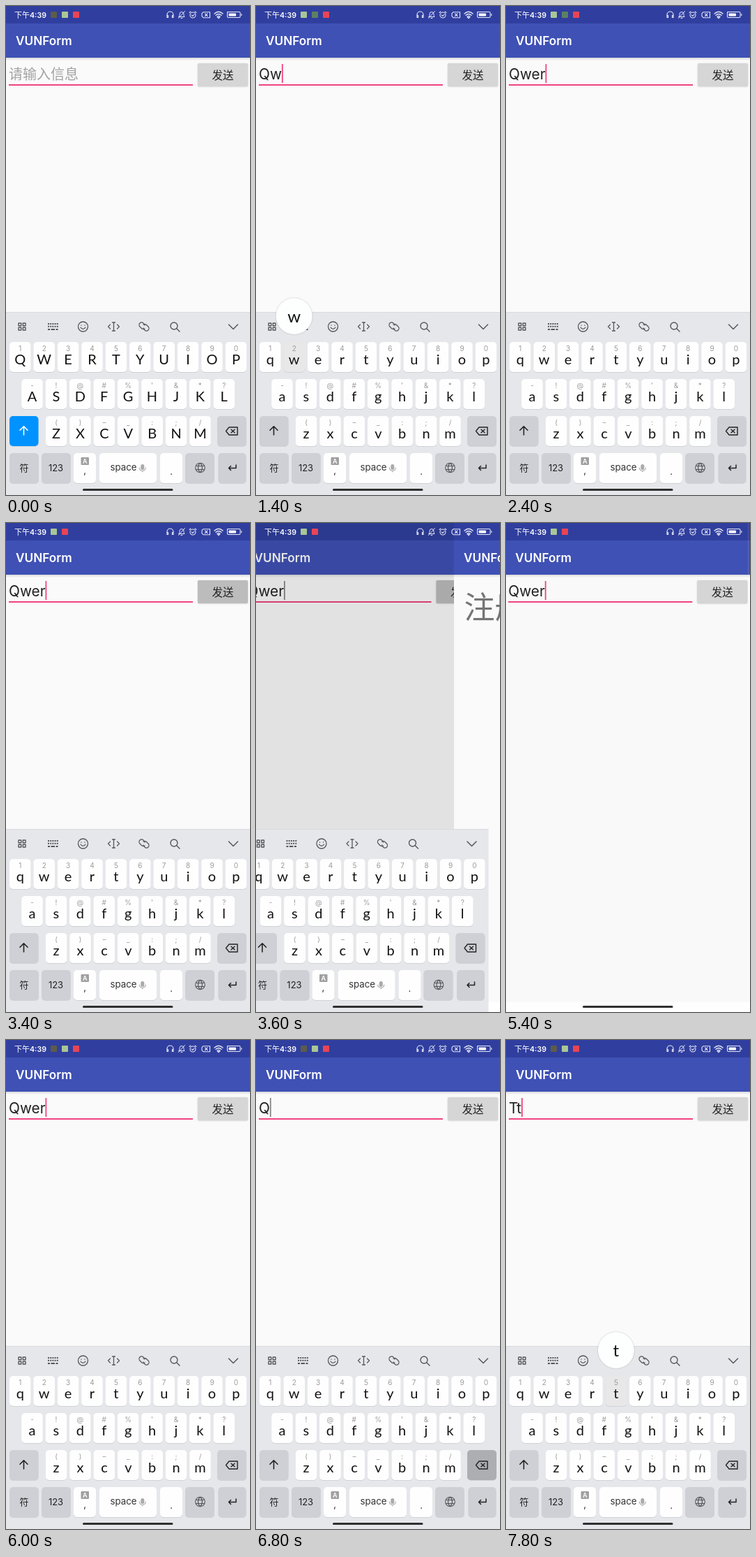
Write an HTML page with a canvas that moves like this. It is 350 px wide and 700 px high and loops after 8 s.

```html
<!DOCTYPE html>
<html lang="zh">
<head>
<meta charset="utf-8">
<title>Message form</title>
<style>
html, body { margin: 0; width: 350px; height: 700px; overflow: hidden; background: #fafafa; }
canvas { display: block; width: 350px; height: 700px; }
</style>
</head>
<body>
<canvas id="stage"></canvas>
<script>
const W = 350, H = 700, LOOP = 8000, STEP = 200;
const cv = document.getElementById('stage');
const c = cv.getContext('2d');
const dpr = window.devicePixelRatio || 1;
cv.width = W * dpr;
cv.height = H * dpr;

const LATIN = 'Inter, "Noto Sans CJK SC", "Noto Sans CJK", sans-serif';
const HAN = '"Noto Sans CJK SC", "Noto Sans CJK", sans-serif';
const KEYS = 'Lato, "Open Sans", sans-serif';
const FIELD = '20.8px ' + LATIN;
const DARK = '#5d5c48', GREEN = '#a9c795', MOSS = '#5d8062', RED = '#e94455', RUST = '#b8683f';
const INK = '#55575b', KEY_GREY = '#ced0d5', ACCENT = '#f1437f';

// Each entry changes only the listed parts of the state.
const events = [
  [0, { text: '', caps: true, press: '', cursor: '', sent: false, badges: [DARK, GREEN, RED] }],
  [200, { text: 'Q', press: 'q', cursor: ACCENT }],
  [400, { caps: false }],
  [600, { press: '' }],
  [800, { cursor: '#888' }],
  [1400, { text: 'Qw', press: 'w', cursor: ACCENT, badges: [GREEN, MOSS, RED] }],
  [1600, { press: '' }],
  [1800, { text: 'Qwe', press: 'e' }],
  [2000, { press: '' }],
  [2200, { text: 'Qwer', press: 'r' }],
  [2400, { press: '' }],
  [2600, { cursor: '' }],
  [2800, { cursor: ACCENT }],
  [3200, { sent: true, badges: [GREEN, RED] }],
  [3600, { cursor: '#888' }],
  [4000, { badges: [GREEN, RUST] }],
  [4400, { sent: false, cursor: ACCENT, badges: [GREEN, RED] }],
  [5800, { badges: [DARK, GREEN, RED] }],
  [6200, { press: 'del' }],
  [6400, { text: 'Qwe' }],
  [6600, { text: 'Qw' }],
  [6800, { text: 'Q', cursor: '#888' }],
  [7000, { text: '', press: '', caps: true, cursor: ACCENT }],
  [7200, { text: 'T', press: 't' }],
  [7400, { caps: false }],
  [7600, { press: '' }],
  [7800, { text: 'Tt', press: 't' }]
];

const stateAt = t => Object.assign({}, ...events.filter(e => e[0] <= t).map(e => e[1]));

function ease(t, start, span) {
  const u = Math.min(1, Math.max(0, (t - start) / span));
  return u * u * (3 - 2 * u);
}

function rect(x, y, w, h, color, r = 0) {
  c.fillStyle = color;
  c.beginPath();
  c.roundRect(x, y, w, h, r);
  c.fill();
}

function label(str, x, base, font, color, align = 'left') {
  c.font = font;
  c.fillStyle = color;
  c.textAlign = align;
  c.fillText(str, x, base);
}

function icon(path, x, y, color, width = 1.3) {
  c.save();
  c.translate(x, y);
  c.strokeStyle = color;
  c.lineWidth = width;
  c.lineCap = c.lineJoin = 'round';
  c.stroke(new Path2D(path));
  c.restore();
}

const ring = r => `M${r} 0A${r} ${r} 0 1 1 ${-r} 0A${r} ${r} 0 1 1 ${r} 0`;

function frame() {
  rect(0, 0, W, H, '#fafafa');
  rect(0, 686, W, 14, '#fff');
  const g = c.createLinearGradient(0, 74, 0, 78);
  g.addColorStop(0, 'rgba(0,0,0,.13)');
  g.addColorStop(1, 'rgba(0,0,0,0)');
  rect(0, 74, W, 4, g);
  rect(0, 0, W, 25, '#303f9f');
  rect(0, 25, W, 49, '#3f51b5');
  label('VUNForm', 14, 56, '600 17.2px ' + LATIN, '#fff');
}

function formPage(s) {
  frame();
  if (s.text) label(s.text, 4, 104.5, FIELD, '#222');
  else label('请输入信息', 4, 104.5, '20px ' + HAN, '#a2a2a2');
  if (s.cursor) {
    c.font = FIELD;
    rect(4 + c.measureText(s.text).width, 83, 1.8, 27, s.cursor);
  }
  rect(4, 112, 264, 2, ACCENT);
  c.save();
  c.shadowColor = 'rgba(0,0,0,.2)';
  c.shadowBlur = 2 * dpr;
  c.shadowOffsetY = 0.5 * dpr;
  rect(275, 82, 72, 33, s.sent ? '#bcbcbc' : '#d6d6d6', 2);
  c.restore();
  label('发送', 311, 104.5, '500 15.5px ' + HAN, '#222', 'center');
}

function donePage() {
  frame();
  label('注册成功', 14.5, 136.5, '500 44px ' + HAN, '#757575');
}

function statusBar(s) {
  const w = '#e4e6f4';
  label('下午', 12, 17, '500 11px ' + HAN, '#fff');
  label('4:39', 34, 16.8, '600 10.6px ' + LATIN, '#fff');
  s.badges.forEach((color, i) => rect(64 + i * 16, 8, 9, 9, color, 1));
  icon('M-4.5 3V0A4.5 4.5 0 0 1 4.5 0V3M-4.5 1V4H-3V1ZM4.5 1V4H3V1Z', 235.5, 12.5, w, 1.2);
  icon('M-4 3H4L3 1V-1A3 3 0 0 0-3-1V1ZM-1 5H1M-4.5 5L4.5-5', 252, 12.5, w, 1);
  icon(ring(4) + 'M-1.7 0L0 1.5L2-1M-5-3.5L-3-5M5-3.5L3-5', 268, 13, w, 1.1);
  icon('M-4-4H5.5V4H-4L-6 2V-2ZM-1.5-1.8L2 1.8M2-1.8L-1.5 1.8', 287, 12.7, w, 1.1);
  icon('M-6-1.5Q0-7 6-1.5M-4 .8Q0-3 4 .8M-2 3Q0 1 2 3L0 5Z', 305, 12.5, w, 1.4);
  icon('M-9.5-4H7.5Q9-4 9-2.5V2.5Q9 4 7.5 4H-8Q-9.5 4-9.5 2.5V-2.5Q-9.5-4-8-4M10.8-1V1', 327, 12.5, w, 1.1);
  rect(319.5, 10.5, 10.5, 4, '#fff', 1);
}

function key(x, y, w, color) {
  rect(x, y + 1, w, 43, '#d0d2d6', 5);
  rect(x, y, w, 43, color, 5);
}

function toolRow() {
  const y = 459;
  icon('M-5-5H-1.3V-1.3H-5ZM1.3-5H5V-1.3H1.3ZM-5 1.3H-1.3V5H-5ZM1.3 1.3H5V5H1.3Z', 23, y, INK, 1.4);
  for (let r = 0; r < 2; r++)
    for (let i = 0; i < 5; i++) rect(60 + i * 3.2, y - 5 + r * 3.8, 2, 2, INK);
  rect(60, y + 3, 3, 2, INK);
  rect(64.5, y + 3, 5.5, 2, INK);
  rect(71.5, y + 3, 3, 2, INK);
  icon(ring(7) + 'M-3.5 1.2Q0 5.5 3.5 1.2M-2.5-2.2V-1.8M2.5-2.2V-1.8', 110.5, y, INK);
  icon('M-2-6H2M0-6V6M-2 6H2M-5-3L-8 0L-5 3M5-3L8 0L5 3', 154.5, y, INK);
  icon('M1-2L-1-5A3.5 3.5 0 0 0-6 0L-3 3Q-1 4 1 3M-1 2L1 5A3.5 3.5 0 0 0 6 0L3-3Q1-4-1-3', 198, y, INK);
  icon('M4-1A5 5 0 1 1-6-1A5 5 0 1 1 4-1M2.8 2.8L7 7', 242, y, INK, 1.4);
  icon('M-6.5-3L0 3.5L6.5-3', 326, y, INK, 1.5);
}

const rows = [
  { keys: 'qwertyuiop', hints: '1234567890', x: 5, y: 481 },
  { keys: 'asdfghjkl', hints: "-!@#%'&*?", x: 22.2, y: 534 },
  { keys: 'zxcvbnm', hints: '()–_:;/', x: 56.8, y: 587 }
];

function letters(s) {
  for (const row of rows) {
    [...row.keys].forEach((k, i) => {
      const x = row.x + i * 34.4, mid = x + 15.3;
      key(x, row.y, 30.6, s.press === k ? '#e8e8e9' : '#fefefe');
      label(row.hints[i], mid, row.y + 13, '10px ' + LATIN, '#9b9b9b', 'center');
      label(s.caps ? k.toUpperCase() : k, mid, row.y + 32, '20px ' + KEYS, '#111', 'center');
    });
  }
}

function bottomRow() {
  const y = 640, base = 666;
  [[5, 42], [51, 42], [257, 42], [304.5, 40]].forEach(k => key(k[0], y, k[1], KEY_GREY));
  [[97, 32], [134, 82], [221, 32]].forEach(k => key(k[0], y, k[1], '#fefefe'));
  label('符', 26, base, '500 13px ' + HAN, '#222', 'center');
  label('123', 71.5, base - 0.5, '13px ' + LATIN, '#222', 'center');
  rect(107.5, 646, 11.5, 11, '#a0a0a0', 1);
  label('A', 113.2, 655, '600 9px ' + LATIN, '#fff', 'center');
  label(',', 113, 670, '13px ' + LATIN, '#222', 'center');
  label('space', 168.5, 665, '13.3px ' + LATIN, '#333', 'center');
  rect(193.3, 656, 5, 8, '#aaa', 2.5);
  icon('M-4.5 0A4.5 4.5 0 0 0 4.5 0M0 4.5V6', 195.8, 661, '#aaa', 1.1);
  label('.', 237, 671, '13px ' + LATIN, '#222', 'center');
  icon(ring(6.8) + 'M0-6.8C-4-3-4 3 0 6.8C4 3 4-3 0-6.8M-6-2.5H6M-6 2.5H6', 278.5, 661, INK, 1.1);
  icon('M5.5-3.5V1H-5M-2-2L-5 1L-2 4', 324.5, 660.5, '#222', 1.5);
}

function popup(s) {
  const row = rows.find(r => r.keys.includes(s.press));
  if (!s.press || !row) return;
  const mid = row.x + row.keys.indexOf(s.press) * 34.4 + 15.3;
  const x = Math.max(28, Math.min(W - 28, mid)), y = row.y - 37;
  c.save();
  c.shadowColor = 'rgba(0,0,0,.25)';
  c.shadowBlur = 2 * dpr;
  rect(x - 26, y - 26, 52, 52, '#fdfefe', 26);
  c.restore();
  label(s.caps ? s.press.toUpperCase() : s.press, x, y + 8.5, '24px ' + KEYS, '#111', 'center');
}

function keyboard(s) {
  rect(0, 438, W, 262, '#e6e7eb');
  rect(0, 438, W, 1, '#d9dade');
  toolRow();
  letters(s);
  key(5, 587, 41.5, s.caps ? '#0093ff' : KEY_GREY);
  icon('M0 6V-6M-5.5-.7L0-6.2L5.5-.7', 25.5, 608, s.caps ? '#fff' : '#222', 1.6);
  key(303, 587, 42, s.press === 'del' ? '#adaeb2' : KEY_GREY);
  icon('M-4-5.5H8V5.5H-4L-8.5 0ZM-1-2.3L4 2.3M4-2.3L-1 2.3', 324, 608.5, '#222', 1.4);
  bottomRow();
  popup(s);
}

function shifted(x, y, draw) {
  c.save();
  c.translate(x, y);
  draw();
  c.restore();
}

function render(t) {
  const s = stateAt(t);
  const slide = ease(t, 3400, 720) - ease(t, 4500, 950);
  const drop = ease(t, 3600, 450) - ease(t, 5400, 500);
  const back = -slide * W / 4;
  c.setTransform(dpr, 0, 0, dpr, 0, 0);
  shifted(back, 0, () => formPage(s));
  if (slide > 0) {
    rect(0, 0, W, H, `rgba(0,0,0,${0.53 * slide})`);
    shifted(W * (1 - slide), 0, donePage);
  }
  statusBar(s);
  if (drop < 1) shifted(back, 262 * drop, () => keyboard(s));
  rect(110, 691, 129.5, 3, '#303030', 1.5);
}

function tick(now) {
  render(Math.floor(now % LOOP / STEP) * STEP);
  requestAnimationFrame(tick);
}
render(0);
requestAnimationFrame(tick);
</script>
</body>
</html>
```
